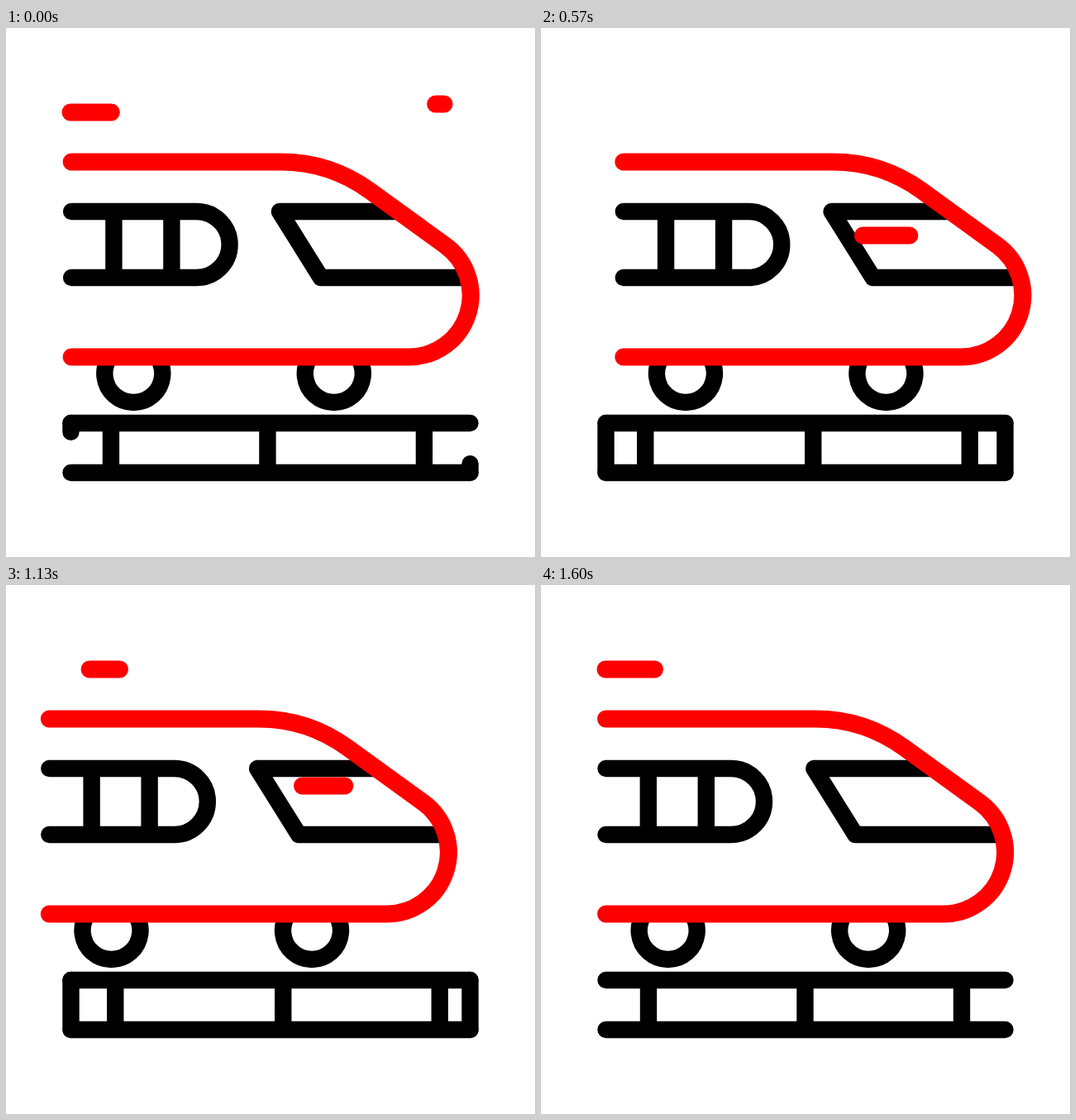
An HTML page that plays this animation: 640x640 px, repeating every 1.67 s.

```html
<!DOCTYPE html>
<html lang="en">
<head>
<meta charset="utf-8">
<title>Train</title>
<style>
  html, body { margin: 0; width: 100%; height: 100%; overflow: hidden; background: #fff; }
  svg { display: block; width: 100%; height: 100%; }
  path { fill: none; stroke: #000; stroke-width: 20.4; stroke-linejoin: round; }
  .round { stroke-linecap: round; }
  .red { stroke: #f00; stroke-width: 21; }
</style>
</head>
<body>
<svg viewBox="0 0 640 640">
  <clipPath id="bed"><rect x="78.5" y="468" width="483" height="80"/></clipPath>
  <g clip-path="url(#bed)"><path id="sleepers"/></g>
  <path class="round" d="M78.5 478H561.5M78.5 538H561.5"/>
  <path class="round" id="leftPost"/>
  <path class="round" id="rightPost"/>
  <g id="train">
    <path d="M125 398A35 35 0 1 0 182.4 398M367.5 398A35 35 0 1 0 424.9 398"/>
    <path class="round" d="M78.5 222H230A40 40 0 0 1 230 302H78.5"/>
    <path d="M129.8 222V302M199.8 222V302"/>
    <path d="M472 222H330.3L380.3 302H558"/>
    <path class="round red" d="M78.5 162H332A183 183 0 0 1 439.3 196.8L530.75 263A74.6 74.6 0 0 1 487 398H78.5"/>
  </g>
  <g id="streaks"></g>
</svg>
<script>
const LOOP = 1670, STEPS = 50, LAST = 48;
const SWAY = 34;                  // how far the train drifts each way
const GAP = 189.5, GROUP = 582;   // sleepers come in groups of three
const $ = id => document.getElementById(id);

// Each streak grows leftwards, then its tail follows after a lag
const streaks = [
  { y: 92, x: 530, start: -1.1 },
  { y: 207, x: 253.5, start: 1.3 },
  { y: 302, x: 441, start: 3.4 },
  { y: 251, x: 589.5, start: 6.3 },
  { y: 343, x: 561.5, start: 17.1 },
  { y: 69, x: 376.5, start: 18.05 },
  { y: 263.5, x: 228.5, start: 18.95 },
  { y: 243, x: 558.5, start: 23.15 },
  { y: 102, x: 137.5, start: 29.4, length: 59.5, lag: 18.5 }
];

for (const s of streaks) {
  s.el = document.createElementNS('http://www.w3.org/2000/svg', 'path');
  s.el.setAttribute('class', 'round red');
  $('streaks').append(s.el);
}

let bars = '';
for (let i = 0; i < 9; i++)
  bars += `M${130 + Math.floor(i / 3) * GROUP + i % 3 * GAP} 478V538`;
$('sleepers').setAttribute('d', bars);

function progress(f, start, length) {
  return Math.min(1, Math.max(0, (f - start) / length));
}

function ease(f, start, length) {
  const p = progress(f, start, length);
  return p * p * (3 - 2 * p);
}

// Forward, back past the middle, home again
function trainX(f) {
  return SWAY * (ease(f, -1.15, 14.45) - 2 * ease(f, 12.6, 15.9) + ease(f, 28, 19.3));
}

// Two groups pass per loop, a little steadier than a plain ease
function trackX(f) {
  const p = progress(f, -1.15, 47.65);
  return 2 * GROUP * ease(p, 0, 1) + 7 * Math.sin(2 * Math.PI * p);
}

function trim(el, x0, y0, x1, y1, tail, head) {
  const at = k => `${x0 + (x1 - x0) * k} ${y0 + (y1 - y0) * k}`;
  el.setAttribute('d', head > tail ? `M${at(tail)}L${at(head)}` : '');
}

function drawStreak({ el, x, y, start, length = 200, lag = 5.5 }, f) {
  const age = (f - start + STEPS) % STEPS;
  trim(el, x, y, x - length, y, ease(age, lag, 8), ease(age, 0, 8));
}

function draw(f) {
  $('train').setAttribute('transform', `translate(${trainX(f)})`);
  $('sleepers').setAttribute('transform', `translate(${-trackX(f)})`);
  const head = ease(f, -1.15, 4.25), tail = ease(f, 40.5, 5.8);
  trim($('leftPost'), 78.5, 478, 78.5, 538, tail, head);
  trim($('rightPost'), 561.5, 538, 561.5, 478, tail, head);
  for (const s of streaks) drawStreak(s, f);
}

const begin = performance.now();
function tick() {
  const t = (performance.now() - begin) % LOOP;
  draw(Math.min(LAST, Math.floor((t + 3.4) * 0.03)));   // 30 steps a second
  requestAnimationFrame(tick);
}
tick();
</script>
</body>
</html>
```
